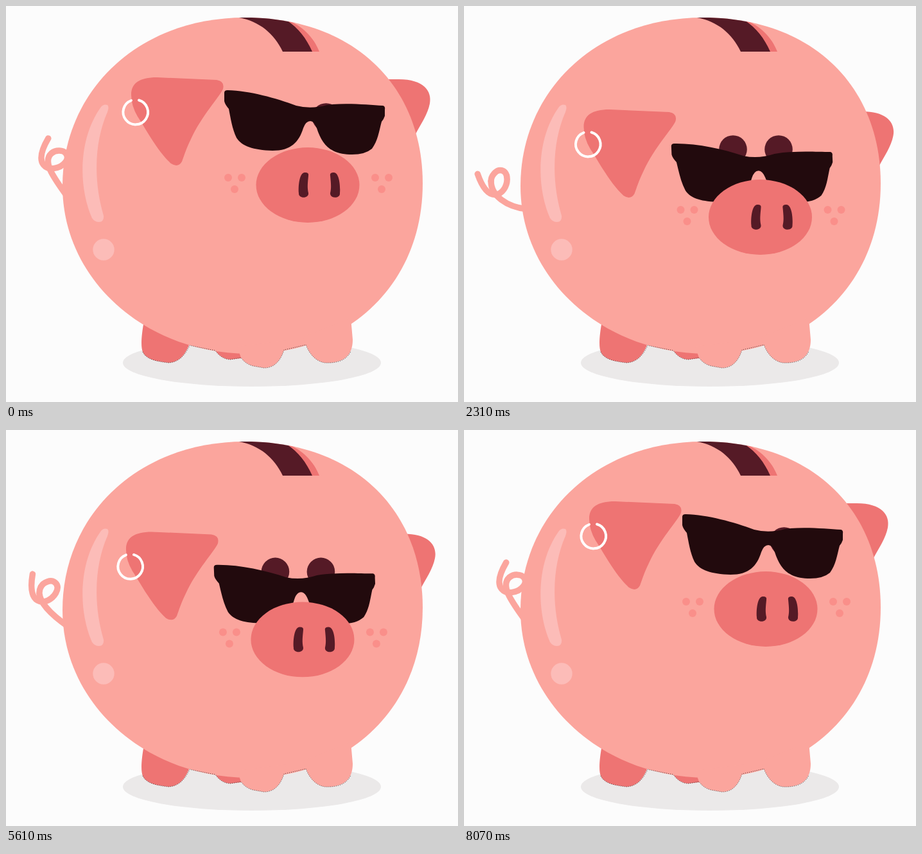
Animation of 704 by 616 pixels, one loop 8.1 s. Source, as an HTML page:

```html
<!DOCTYPE html>
<html lang="en">
<head>
<meta charset="utf-8">
<title>Piggy bank</title>
<style>
html, body { margin: 0; width: 100%; height: 100%; overflow: hidden; background: #fcfcfc; }
svg { display: block; width: 704px; height: 616px; }
.skin { fill: #fba59d; }
.rose { fill: #ee7473; }
.plum { fill: #551a26; }
.shine { fill: #fcbcb8; }
.spot { fill: #fa8f8a; }
.tail { fill: none; stroke: #fba59d; stroke-width: 9.5; stroke-linecap: round; }
.ring { fill: none; stroke: #fff; stroke-width: 4; stroke-linecap: round; }
.seam { fill: none; stroke: #4a3436; stroke-dasharray: 1 2; }
</style>
</head>
<body>
<svg viewBox="0 0 704 616">
  <defs>
    <path id="body" d="M372 18C546 18 649 128 649 276C649 435 530 541 378 541C220 541 88 428 88 280C88 132 206 18 372 18Z"/>
    <clipPath id="inBody"><use href="#body"/></clipPath>
    <path id="nostril" d="M471 264C470 275 469 282 471 291C472 300 455 300 456 291C455 280 457 258 466 259Q472 259 471 264Z"/>
    <g id="freckles"><circle cx="346" cy="267" r="6"/><circle cx="367" cy="267" r="6"/><circle cx="356" cy="285" r="6"/></g>
  </defs>

  <ellipse cx="383" cy="555" rx="201" ry="37" fill="#ebe9e9"/>
  <path id="curl" class="tail" d="M21 262C26 276 35 294 48 294C60 294 67 280 67 270S62 256 56 256S42 264 42 273"/>
  <path id="stem" class="tail"/>
  <path id="earR" class="rose" d="M575 114H612C650 114 664 132 660 152C657 168 646 184 638 199L630 213L575 200Z"/>

  <path class="rose" d="M216 485C210 515 210 530 213 538C219 551 238 553 253 555C271 554 280 541 286 525L290 500Z"/>
  <path class="rose" d="M326 528V536Q335 549 349 550L366 548L385 530Z"/>
  <use href="#body" class="skin"/>
  <path class="skin" d="M360 530L366 547Q373 557 385 560L402 563Q424 563 433 535L436 520Z"/>
  <path class="skin" d="M462 515L467 527Q477 552 497 555C530 556 540 540 540 519L537 485Z"/>
  <path class="seam" d="M213 538C219 551 238 553 253 555C271 554 280 541 286 528L326 536Q335 549 349 550L366 547Q373 557 385 560L402 563Q424 563 433 535L467 527Q477 552 497 555C521 556 532 548 537 537"/>

  <g clip-path="url(#inBody)">
    <path class="rose" d="M430 10L437 22C462 30 480 50 488 71H470Z"/>
    <path class="plum" d="M356 17C391 21 417 41 431 71H477C467 49 456 35 437 22L425 10H356Z"/>
  </g>
  <path class="shine" d="M148 157Q152 152 158 154Q161 157 158 165C140 205 134 265 152 326Q153 336 145 336Q138 336 134 330C112 280 113 205 148 157Z"/>
  <circle class="shine" cx="152" cy="379" r="16.7"/>

  <g id="face">
    <g class="plum"><circle cx="427.5" cy="173" r="21.8"/><circle cx="498.5" cy="173" r="21.8"/></g>
    <g class="spot"><use href="#freckles"/><use href="#freckles" x="229"/></g>
  </g>
  <g id="earL">
    <path class="rose" d="M195 138C195 120 208 111 235 111L328 115Q341 117 338 129C333 141 305 170 288 207C281 221 277 234 274 242Q268 252 257 245C236 226 217 190 205 172Q195 155 195 138Z"/>
    <path class="ring" d="M207 146.500A19.300 19.300 0 1 1 195 147"/>
  </g>
  <path id="shades" fill="#220a0d" d="M340 135Q340 131 345 131C380 132 420 143 452 155Q475 161 500 154C530 150 565 154 587 155Q591 156 590 161V171Q588 177 585 180C581 195 579 210 570 222Q558 232 535 231C505 230 492 215 484 190Q480 179 474 179Q467 179 463 190C456 212 444 225 415 225C385 224 367 218 359 205C352 190 350 175 347 160Q341 153 340 148Z"/>
  <g id="snout">
    <ellipse class="rose" cx="470" cy="278.500" rx="80.500" ry="58.400"/>
    <g class="plum"><use href="#nostril"/><use href="#nostril" transform="matrix(-1 0 0 1 976 0)"/></g>
  </g>
</svg>
<script>
const LOOP = 8100, STEP = 900, HALF = STEP / 2, SWING = 50;
const el = id => document.getElementById(id);
const set = (id, name, value) => el(id).setAttribute(name, value);
const move = (id, x, y, extra = '') => set(id, 'transform', `translate(${x} ${y})${extra}`);
const ease = (t, start, span) => {
  const p = Math.min(1, Math.max(0, (t - start) / span));
  return p < .5 ? 4 * p ** 3 : 1 - 4 * (1 - p) ** 3;
};
// Rises from 0 to 1 and back, one step long
const bump = (t, start) => ease(t, start, HALF) - ease(t, start + HALF, HALF);

// The curl turns as one piece; the stem bends between it and the body
function drawTail(k) {
  const angle = SWING * (1 - k), pivot = new DOMPoint(103.5, 282);
  const turn = new DOMMatrix().rotate(angle);
  const spin = (x, y) => turn.transformPoint(new DOMPoint(x, y));
  const join = spin(42 - pivot.x, 273 - pivot.y), down = spin(0, 22), lean = spin(-32, -3);
  const x = pivot.x + join.x, y = pivot.y + join.y, rootX = 98, rootY = 300 + 16 * k;
  set('curl', 'transform', `rotate(${angle} ${pivot.x} ${pivot.y})`);
  set('stem', 'd', `M${x} ${y}C${x + down.x} ${y + down.y} ${rootX + lean.x} ${rootY + lean.y} ${rootX} ${rootY}`);
}

function draw(t) {
  drawTail(bump(t % STEP, 0));

  const nod = ease(t, 900, STEP) - ease(t, 5400, STEP);
  const slide = ease(t, 920, STEP) - ease(t, 5400, STEP);
  const perk = bump(t, 3150);
  const x = -8.5 * nod, y = 50 * nod;
  move('face', x, y);
  move('snout', x, y - 2 * perk);
  move('earL', x, y - 2.5 * perk, ` rotate(${1.7 * perk} 267 190)`);
  move('earR', -x - 3 * perk, y - 3 * perk);
  move('shades', -17.3 * slide, 83.3 * slide - 3 * perk, ` rotate(${-2.6 * slide} 340 132)`);
}

const begin = performance.now();
function tick() {
  draw((performance.now() - begin) % LOOP);
  requestAnimationFrame(tick);
}
tick();
</script>
</body>
</html>
```
